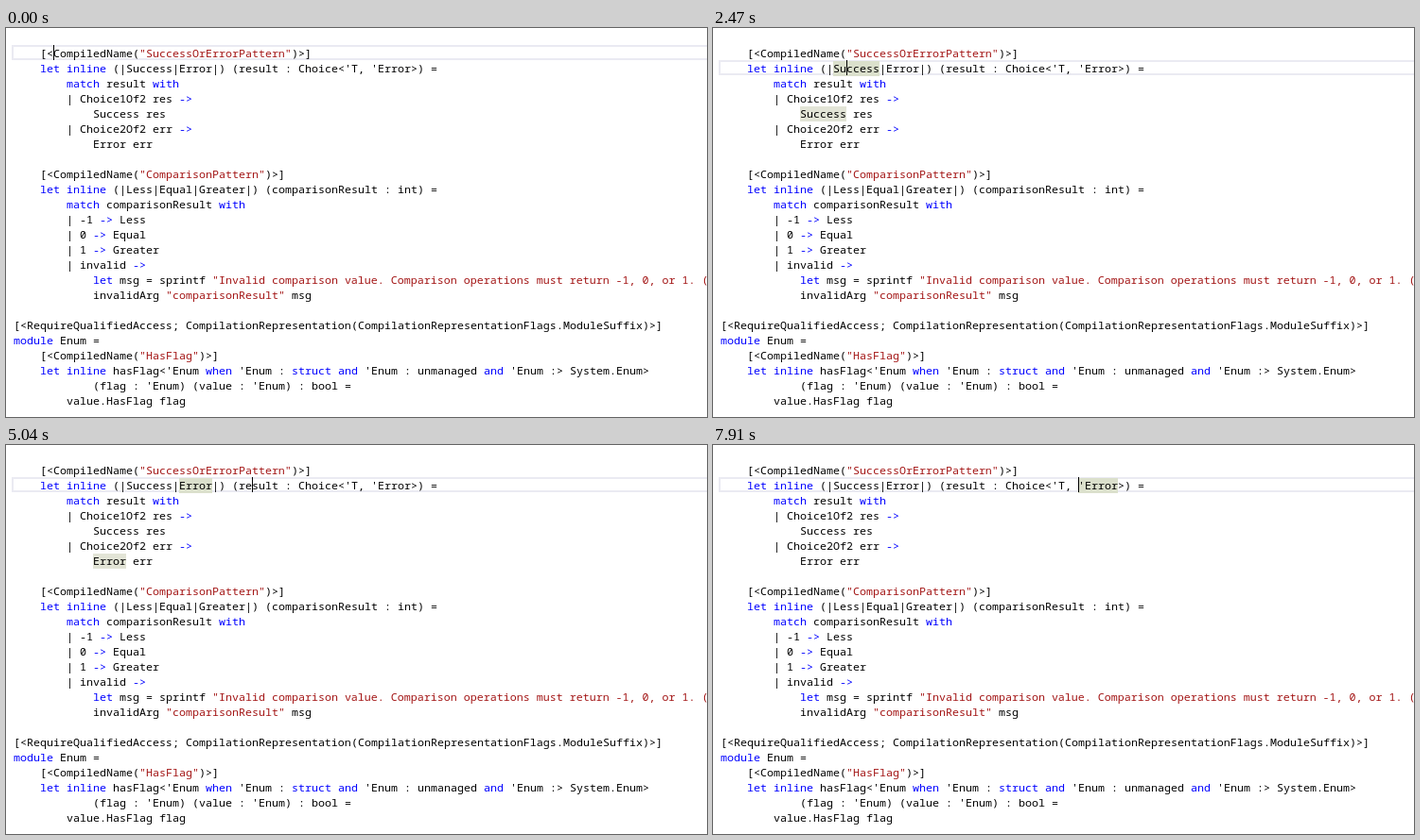
Recreate the animation shown at these times as an HTML page with a canvas. Size 741 px wide and 412 px high, loop 8 s.

```html
<!DOCTYPE html>
<html lang="en">
<head>
<meta charset="utf-8">
<title>Code editor</title>
<style>
  html, body { margin: 0; width: 100%; height: 100%; overflow: hidden; background: #fff; }
  canvas { display: block; width: 741px; height: 412px; }
</style>
</head>
<body>
<canvas id="stage" width="741" height="412"></canvas>
<script>
const ctx = document.getElementById('stage').getContext('2d', { alpha: false });
const W = 741, H = 412, LOOP = 8000;
const LEFT = 8, TOP = 18, CELL = 7, ROW = 16;
const BLINK = 530, MARK_DELAY = 260;

const code = `    [<CompiledName("SuccessOrErrorPattern")>]
    let inline (|Success|Error|) (result : Choice<'T, 'Error>) =
        match result with
        | Choice1Of2 res ->
            Success res
        | Choice2Of2 err ->
            Error err

    [<CompiledName("ComparisonPattern")>]
    let inline (|Less|Equal|Greater|) (comparisonResult : int) =
        match comparisonResult with
        | -1 -> Less
        | 0 -> Equal
        | 1 -> Greater
        | invalid ->
            let msg = sprintf "Invalid comparison value. Comparison operations must return -1, 0, or 1. (
            invalidArg "comparisonResult" msg

[<RequireQualifiedAccess; CompilationRepresentation(CompilationRepresentationFlags.ModuleSuffix)>]
module Enum =
    [<CompiledName("HasFlag")>]
    let inline hasFlag<'Enum when 'Enum : struct and 'Enum : unmanaged and 'Enum :> System.Enum>
            (flag : 'Enum) (value : 'Enum) : bool =
        value.HasFlag flag`.split('\n');

const KEYWORD = /^(let|inline|match|with|module|when|struct|and|->)$/;
const COLORS = { string: '#a31515', keyword: '#0000ff', name: '#000', sign: '#000' };

const kindOf = s =>
  s[0] === '"' ? 'string' : KEYWORD.test(s) ? 'keyword' : /\w/.test(s) ? 'name' : 'sign';

const tokens = code.flatMap((line, row) =>
  [...line.matchAll(/"[^"]*"?|'?\w+|[^\s\w"']+/g)].map(m => ({
    text: m[0], row, col: m.index, kind: kindOf(m[0])
  })));

const nameAt = (row, col) => tokens.find(k =>
  k.kind === 'name' && k.row === row && col >= k.col && col < k.col + k.text.length);

// Caret runs: a key press, or a held arrow key that repeats evenly.
const runs = [
  [-120, -120, 0, 6, 6],
  [960, 1220, 0, 7, 8],
  [1650, 1650, 1, 8, 8],
  [1880, 2190, 1, 10, 19],
  [3280, 3470, 1, 20, 26],
  [4500, 4790, 1, 27, 36],
  [5440, 5440, 1, 37, 37],
  [5870, 6310, 1, 38, 50],
  [7120, 7120, 1, 51, 51],
  [7390, 7630, 1, 52, 54]
].map(([start, end, row, from, to]) =>
  ({ start, end, row, from, to, name: nameAt(row, to)?.text }));

function caretAt(t) {
  const { start, end, row, from, to } = runs.findLast(r => r.start <= t);
  const p = t < end ? (t - start) / (end - start) : 1;
  return {
    row,
    col: Math.round(from + (to - from) * p),
    on: t < end || Math.floor((t - end) / BLINK) % 2 === 0
  };
}

// The name the caret last rested on is marked wherever it occurs.
const markedAt = t => runs.findLast(r => r.name && r.end + MARK_DELAY <= t)?.name;

const px = col => LEFT + col * CELL;
const py = row => TOP + row * ROW;

function draw(t) {
  const caret = caretAt(t), marked = markedAt(t);

  ctx.fillStyle = '#fff';
  ctx.fillRect(0, 0, W, H);

  ctx.strokeStyle = '#eaeaf2';
  ctx.lineWidth = 2;
  ctx.strokeRect(LEFT - 1, py(caret.row) + 1, W, ROW - 2);

  ctx.font = '11.667px "Noto Sans Mono", "DejaVu Sans Mono", monospace';
  ctx.textBaseline = 'alphabetic';
  for (const { text, row, col, kind } of tokens) {
    if (kind === 'name' && text === marked) {
      ctx.fillStyle = row === caret.row ? '#dbe0cc' : '#e2e4d6';
      ctx.fillRect(px(col), py(row) + 1, text.length * CELL, ROW);
    }
    ctx.fillStyle = COLORS[kind];
    ctx.fillText(text, px(col), py(row) + 13);
  }

  if (caret.on) {
    ctx.fillStyle = '#000';
    ctx.fillRect(px(caret.col), py(caret.row), 1, ROW);
  }
}

const start = performance.now();
function tick() {
  draw((performance.now() - start) % LOOP);
  requestAnimationFrame(tick);
}
tick();
</script>
</body>
</html>
```
